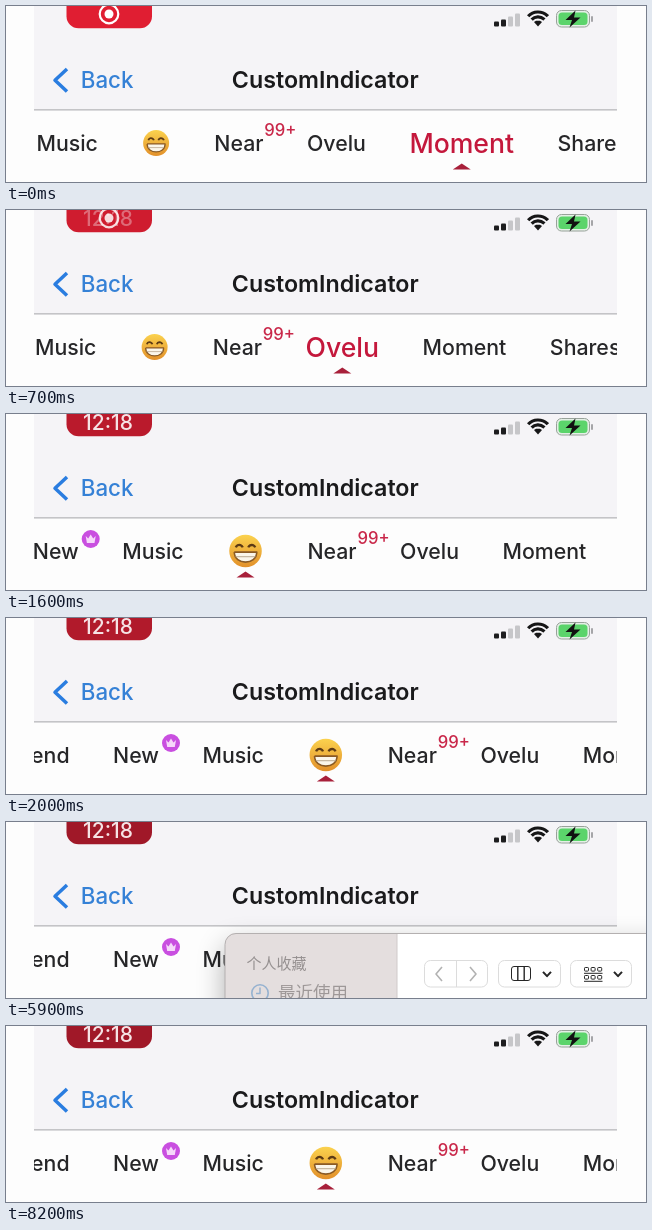
Recreate the animation shown at these times as an HTML page with a canvas. Size 640 px wide and 176 px high, loop 8400 ms.

```html
<!DOCTYPE html>
<html lang="en">
<head>
<meta charset="utf-8">
<title>CustomIndicator</title>
<style>
  html, body { margin: 0; width: 100%; height: 100%; overflow: hidden; background: #fdfdfd; }
  canvas { display: block; width: 100vw; height: 100vh; }
</style>
</head>
<body>
<canvas id="stage" width="640" height="176"></canvas>
<script>
const ctx = document.getElementById('stage').getContext('2d');
const LOOP = 8400, STEP = 100;
const LEFT = 28, RIGHT = 611, GAP = 43.5, MID = 137.4, GROW = 0.25;
const UI = 'Inter, sans-serif', CJK = '"Noto Sans CJK SC", "Noto Sans CJK", sans-serif';
const INK = [38, 38, 40], RED = [196, 24, 60];

const clamp = v => Math.max(0, Math.min(1, v));
const lerp = (a, b, k) => a + (b - a) * k;
const progress = (t, from, to) => clamp((t - from) / (to - from));
const ease = k => k * k * (3 - 2 * k);
const mix = (a, b, k) => `rgb(${a.map((v, i) => Math.round(lerp(v, b[i], k))).join(',')})`;

function text(str, x, y, size, color, weight = 450, family = UI) {
  ctx.font = `${weight} ${size}px ${family}`;
  ctx.fillStyle = color;
  ctx.fillText(str, x, y);
}
function rounded(x, y, w, h, r, fill, stroke) {
  ctx.beginPath();
  ctx.roundRect(x, y, w, h, r);
  if (fill) { ctx.fillStyle = fill; ctx.fill(); }
  if (stroke) { ctx.strokeStyle = stroke; ctx.lineWidth = 1; ctx.stroke(); }
}
function disc(x, y, r, fill) {
  ctx.beginPath();
  ctx.arc(x, y, r, 0, Math.PI * 2);
  ctx.fillStyle = fill;
  ctx.fill();
}
function trace(points) {
  ctx.beginPath();
  points.forEach(([x, y]) => ctx.lineTo(x, y));
}
function polyline(points, color, width) {
  trace(points);
  ctx.strokeStyle = color;
  ctx.lineWidth = width;
  ctx.stroke();
}
function polygon(points, color) {
  trace(points);
  ctx.closePath();
  ctx.fillStyle = color;
  ctx.fill();
}
function withAlpha(alpha, draw) {
  if (alpha <= 0) return;
  ctx.save();
  ctx.globalAlpha = alpha;
  draw();
  ctx.restore();
}

function drawPill(t) {
  rounded(60.5, -20, 85.5, 42.3, 12, mix([224, 30, 50], [160, 24, 40], progress(t, 0, 2700)));
  withAlpha(progress(t, 500, 1000), () => text('12:18', 77, 15.5, 21, '#f6e3e5', 500));
  withAlpha(1 - progress(t, 500, 1000) ** 2, () => {
    ctx.beginPath();
    ctx.arc(103, 8, 9.3, 0, Math.PI * 2);
    ctx.strokeStyle = '#fff';
    ctx.lineWidth = 2.2;
    ctx.stroke();
    disc(103, 8, 4.5, '#fff');
  });
}

function drawStatus() {
  [5, 7, 10, 13].forEach((h, i) =>
    rounded(488 + i * 7, 20.5 - h, 5, h, 1, i < 2 ? '#1c1c1e' : '#c6c6c9'));

  ctx.strokeStyle = '#161617';
  ctx.lineWidth = 3.2;
  for (const r of [13.5, 8.7]) {
    ctx.beginPath();
    ctx.arc(532, 19.5, r, -Math.PI * 0.76, -Math.PI * 0.24);
    ctx.stroke();
  }
  polygon([[532, 20.5], [528, 16], [530, 14.8], [534, 14.8], [536, 16]], '#161617');

  rounded(550.5, 4.5, 33, 16.5, 5, '#e4efe6', '#98a29a');
  rounded(552.5, 6.5, 29, 12.5, 3.5, '#5bd46b');
  rounded(585, 10, 2, 6, 1, '#a5a5a8');
  polygon([[569.5, 4.5], [559.5, 14], [566, 14], [563.5, 21.5], [574.5, 11.5], [568, 11.5]], '#111');
}

function drawHeader(t) {
  ctx.fillStyle = '#f5f4f7';
  ctx.fillRect(LEFT, 0, RIGHT - LEFT, 104);
  ctx.fillStyle = '#c4c4c7';
  ctx.fillRect(LEFT, 103, RIGHT - LEFT, 1.6);
  drawPill(t);
  drawStatus();
  polyline([[61, 63], [49, 74.3], [61, 85.6]], '#2a7de0', 3.5);
  text('Back', 74.8, 82, 22.3, '#3581d6');
  text('CustomIndicator', 225.8, 82.3, 23.25, '#1a1a1c', 600);
}

function drawFace(x, y, scale) {
  ctx.save();
  ctx.translate(x, y);
  ctx.scale(scale, scale);
  const glow = ctx.createLinearGradient(0, -13, 0, 13);
  glow.addColorStop(0, '#fbd24e');
  glow.addColorStop(1, '#e2902a');
  disc(0, 0, 13, glow);
  ctx.strokeStyle = '#5c3a14';
  ctx.lineWidth = 1.9;
  for (const side of [-5, 5]) {
    ctx.beginPath();
    ctx.arc(side, -2, 2.9, Math.PI * 1.1, Math.PI * 1.9);
    ctx.stroke();
  }
  ctx.beginPath();
  ctx.moveTo(-9, 0.8);
  ctx.lineTo(9, 0.8);
  ctx.bezierCurveTo(9, 11.5, -9, 11.5, -9, 0.8);
  ctx.fillStyle = '#fbf6ea';
  ctx.fill();
  ctx.strokeStyle = '#8a5a24';
  ctx.lineWidth = 1.3;
  ctx.stroke();
  polyline([[-8, 4.5], [8, 4.5]], '#b9a890', 0.8);
  ctx.restore();
}

function drawCrown(x, y) {
  disc(x, y, 9, '#c94fe0');
  polygon([[x - 5, y - 3], [x - 2.5, y - 0.5], [x, y - 4.5], [x + 2.5, y - 0.5],
    [x + 5, y - 3], [x + 3.8, y + 4], [x - 3.8, y + 4]], '#f6d8fa');
}

// Tabs are laid out to the right of "Music"; the two before it hang off its left edge.
const TABS = ['Music', null, 'Near', 'Ovelu', 'Moment', 'Shares'];
const TAB_SIZE = 21.3;
function tabWidth(label) {
  if (!label) return 29.5;
  ctx.font = `450 ${TAB_SIZE}px ${UI}`;
  return ctx.measureText(label).width;
}
function drawLabel(label, x, focus = 0) {
  const size = TAB_SIZE * (1 + GROW * focus);
  text(label, x, MID + size * 0.364, size, mix(INK, RED, focus), 450 + 50 * focus);
}

function selection(t) {
  return 4 - ease(progress(t, 150, 550)) - ease(progress(t, 730, 1030)) - ease(progress(t, 1240, 1540));
}
function scrollX(t) {
  return 30.5 - 1.5 * progress(t, 300, 600)
    + 81.5 * ease(progress(t, 1030, 1330))
    + 86 * ease(progress(t, 1545, 1895));
}

function drawTabs(t) {
  const selected = selection(t);
  ctx.save();
  ctx.beginPath();
  ctx.rect(LEFT, 104.5, RIGHT - LEFT, 72);
  ctx.clip();

  let x = scrollX(t), marker = 0;
  const newX = x - GAP - tabWidth('New');
  drawLabel('New', newX);
  drawCrown(x - GAP + 12, 125);
  drawLabel('Recommend', newX - GAP - tabWidth('Recommend'));

  TABS.forEach((label, i) => {
    const focus = clamp(1 - Math.abs(selected - i));
    const width = tabWidth(label) * (1 + GROW * focus);
    if (label) drawLabel(label, x, focus);
    else drawFace(x + width / 2, MID - 0.3, 1 + GROW * focus);
    if (label === 'Near') text('99+', x + width + 0.8, 130, 16.7, '#c9284a');
    marker += focus * (x + width / 2);
    x += width + GAP;
  });
  polygon([[marker, 157.5], [marker + 9, 163.6], [marker - 9, 163.6]], '#a8203a');
  ctx.restore();
}

function drawChevron(x, y, dx, dy, color, width) {
  const points = dx ? [[x - dx, y - 7], [x + dx, y], [x - dx, y + 7]]
                    : [[x - 4, y - dy], [x, y + dy], [x + 4, y - dy]];
  polyline(points, color, width);
}

function drawToolbar() {
  for (const [x, w] of [[418.5, 63], [492.5, 62], [564.5, 61]])
    rounded(x, 138.5, w, 26.5, 6, '#fff', '#dcdcdc');
  polyline([[450.5, 139], [450.5, 165]], '#dcdcdc', 1);
  drawChevron(433, 152, -3, 0, '#b2b2b2', 1.6);
  drawChevron(467, 152, 3, 0, '#b2b2b2', 1.6);

  rounded(505.5, 144.5, 19, 14, 2.5, null, '#262626');
  for (const x of [511.8, 518.2]) polyline([[x, 144.5], [x, 158.5]], '#262626', 1.4);
  for (const y of [145, 153]) {
    for (let i = 0; i < 3; i++) rounded(578.5 + i * 6.6, y + 0.5, 4, 3.6, 0.8, null, '#262626');
    polyline([[578, y + 6.3], [596.5, y + 6.3]], '#262626', 1);
  }
  for (const x of [541, 612]) drawChevron(x, 152, 0, 2.2, '#262626', 2);
}

function drawDialog(t) {
  if (t < 5900 || t >= 7500) return;
  const active = progress(t, 5900, 6200);
  withAlpha(1 - progress(t, 7000, 7500), () => {
    ctx.save();
    ctx.shadowColor = 'rgba(0,0,0,0.32)';
    ctx.shadowBlur = 28;
    ctx.shadowOffsetY = 12;
    rounded(219, 111, 460, 200, 11, '#fff');
    ctx.restore();
    rounded(219, 111, 172, 200, [11, 0, 0, 0], mix([228, 222, 222], [226, 220, 220], active));
    polyline([[391, 111], [391, 176]], '#d0caca', 1);
    rounded(219, 111.5, 460, 200, 11, null, '#b4b0b0');

    text('个人收藏', 240.5, 146.5, 15, '#959090', 500, CJK);
    text('最近使用', 272, 177, 17.5, mix([158, 152, 152], [58, 53, 53], active), 400, CJK);
    const blue = mix([150, 178, 208], [30, 116, 232], active);
    ctx.beginPath();
    ctx.arc(254, 171, 8.2, 0, Math.PI * 2);
    ctx.strokeStyle = blue;
    ctx.lineWidth = 1.6;
    ctx.stroke();
    polyline([[254, 165.5], [254, 171.5], [250, 171.5]], blue, 1.5);
    drawToolbar();
  });
}

function cursorAt(t) {
  if (t < 6600 || t >= 8200) return null;
  if (t < 7700) {
    const k = 1 - (1 - progress(t, 6600, 6800)) ** 1.4;
    return [lerp(485, 432, k), lerp(138, 101, k)];
  }
  const k = ease(progress(t, 7700, 8000));
  return [lerp(432, 408, k), lerp(101, 168, k)];
}
function drawCursor(t) {
  const tip = cursorAt(t);
  if (!tip) return;
  ctx.save();
  ctx.translate(...tip);
  const arrow = [[0.8, 1], [0.8, 17.5], [4.6, 14], [7.6, 21], [10.6, 19.7], [7.6, 13], [12.6, 12.8]];
  trace(arrow);
  ctx.closePath();
  ctx.strokeStyle = '#fff';
  ctx.lineWidth = 2.4;
  ctx.stroke();
  polygon(arrow, '#000');
  ctx.restore();
}

function render(now) {
  const t = Math.floor((now % LOOP) / STEP) * STEP;
  ctx.fillStyle = '#fdfdfd';
  ctx.fillRect(0, 0, 640, 176);
  ctx.lineJoin = 'round';
  drawHeader(t);
  drawTabs(t);
  drawDialog(t);
  drawCursor(t);
}

const start = performance.now();
function loop() {
  render(performance.now() - start);
  requestAnimationFrame(loop);
}
loop();
</script>
</body>
</html>
```
